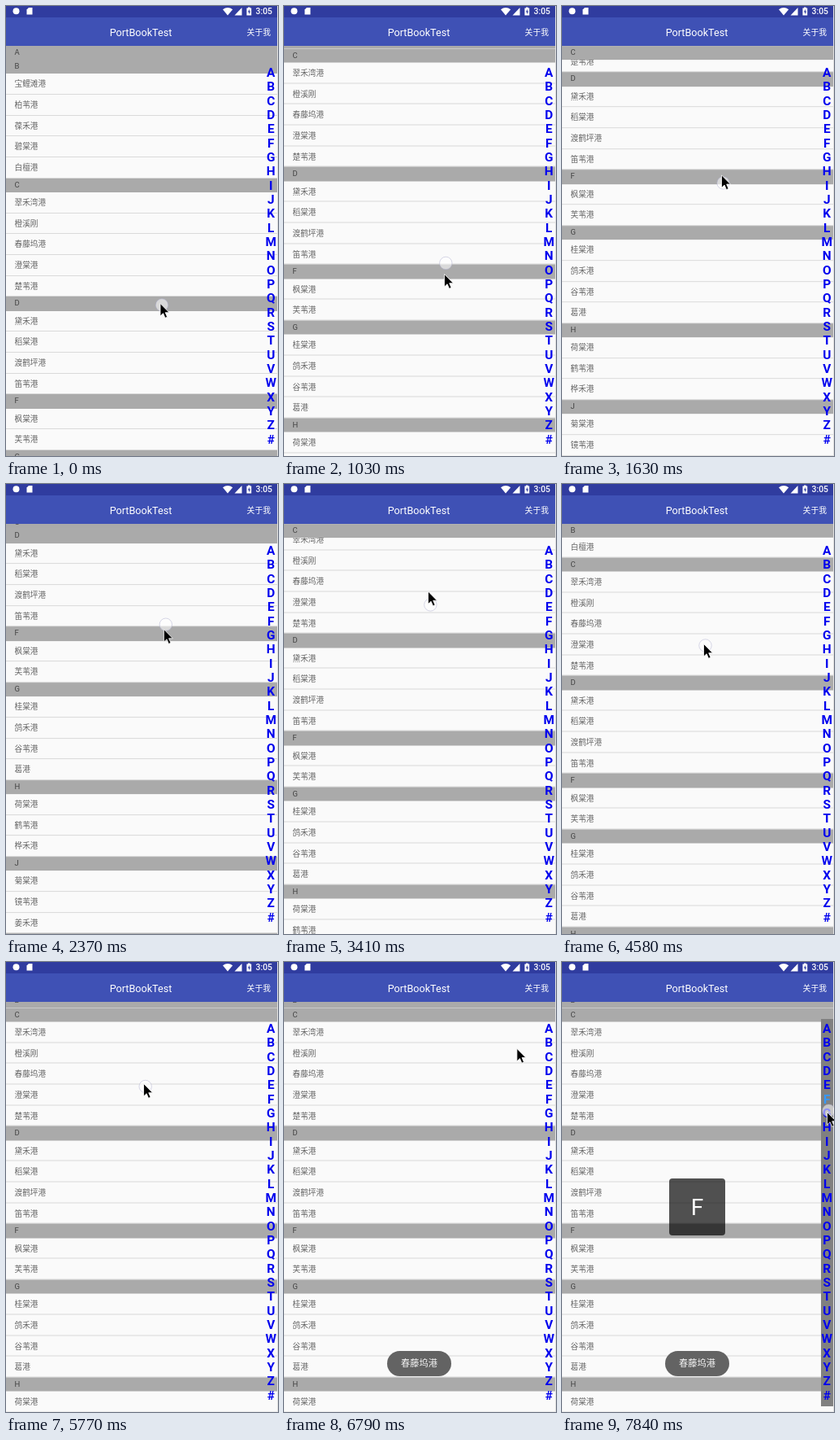
An HTML page for the animation above (7990 ms loop, 335 by 553 pixels).

```html
<!DOCTYPE html>
<html lang="zh-CN">
<head>
<meta charset="utf-8">
<title>Contact list</title>
<style>
html, body { margin: 0; width: 100%; height: 100%; overflow: hidden; }
body { position: relative; background: #fafafa; font-family: Roboto, "Noto Sans CJK SC", "Noto Sans CJK", sans-serif; }
body > * { position: absolute; }
#status { left: 0; top: 0; width: 333.5px; height: 14px; background: #303c9f; }
#bar { left: 0; top: 14px; width: 333.5px; height: 35px; background: #3f51b5; color: #fff; line-height: 37px; }
#bar b { position: absolute; width: 332px; text-align: center; font-weight: 400; font-size: 12.6px; }
#bar i { position: absolute; right: 7.5px; font-style: normal; font-size: 9.8px; }
#view { left: 0; top: 49px; width: 333.5px; height: 504px; overflow: hidden; }
#list { position: absolute; width: 100%; }
.head { position: relative; z-index: 1; height: 17.2px; line-height: 15px; padding-left: 10.5px; background: #aaa; color: #444; font-size: 9.5px; }
.item { box-sizing: border-box; height: 25.7px; line-height: 25px; padding-left: 10.5px; border-bottom: 1px solid #dadada; color: #666; font-size: 9.7px; }
#index { left: 319px; top: 70px; width: 14.5px; height: 476px; padding-top: 4px; box-sizing: border-box; color: #0000ee; font-weight: 700; font-size: 15.4px; }
#index div { height: 17.33px; line-height: 17.33px; display: flex; justify-content: center; }
#popup { left: 132px; top: 266px; width: 69px; height: 70px; border-radius: 4px; background: rgba(0,0,0,.68); color: #fff; font-size: 28px; line-height: 72px; text-align: center; }
#toast { left: 127px; top: 478px; width: 79px; height: 31px; border-radius: 16px; background: #636363; color: #f4f4f4; font-size: 11.2px; line-height: 31px; text-align: center; }
#edge { left: 333.5px; top: 0; width: 1.5px; height: 553px; background: #e2e2e2; }
#over { left: 0; top: 0; }
</style>
</head>
<body>
<div id="view"><div id="list"></div></div>
<div id="status"></div>
<div id="bar"><b>PortBookTest</b><i>关于我</i></div>
<div id="index"></div>
<div id="popup"></div>
<div id="toast">春藤坞港</div>
<div id="edge"></div>
<svg id="over" width="335" height="553">
  <g fill="#fff">
    <circle cx="12.5" cy="6.3" r="4"/>
    <path d="M28 2h4.5v8.6h-7V4.6z"/>
    <path d="M267 4.2Q273 -.2 279.2 4.2L273 11.4z"/>
    <path d="M290.5 2v9.4H281.5z"/>
    <path d="M298 1.4h2.6v1.2h1.6v8.8h-5.8V2.6H298z"/>
    <text x="307.5" y="10.3" font-size="10.4" font-weight="500">3:05</text>
  </g>
  <path d="M299.8 3.8l-2 3.6h1.4v2.8l2-3.7h-1.4z" fill="#303c9f"/>
  <circle id="dot" r="7.7" fill="#fff" fill-opacity=".55" stroke="#aaaacc" stroke-opacity=".6" stroke-width=".8"/>
  <path id="arrow" d="M0 0V15.5L3.6 12.2 6 17.8 8.6 16.7 6.2 11.2H11Z" stroke="#fff" stroke-width=".8"/>
</svg>
<script>
const LOOP = 7990, STEP = 148, HEAD = 17.2, ITEM = 25.7, LETTER = 17.33;
const $ = id => document.getElementById(id);

const ports = {
  A: '',
  B: '宝鲤滩港 柏苇港 葆禾港 碧棠港 白檀港',
  C: '翠禾湾港 橙溪刚 春藤坞港 澄棠港 楚苇港',
  D: '黛禾港 稻棠港 渡鹤坪港 笛苇港',
  F: '枫棠港 芙苇港',
  G: '桂棠港 鸽禾港 谷苇港 葛港',
  H: '荷棠港 鹤苇港 桦禾港',
  J: '菊棠港 镜苇港 姜禾港',
  L: '莲棠港 麓苇港 璃禾港'
};

function add(parent, text, className = '') {
  const el = document.createElement('div');
  el.className = className;
  el.textContent = text;
  return parent.appendChild(el);
}

let listHeight = 0;
const sections = Object.entries(ports).map(([letter, names]) => {
  const items = names.split(' ').filter(Boolean);
  const section = { head: add($('list'), letter, 'head'), y: listHeight, slack: items.length * ITEM };
  items.forEach(name => add($('list'), name, 'item'));
  listHeight += HEAD + section.slack;
  return section;
});

const letters = [...'ABCDEFGHIJKLMNOPQRSTUVWXYZ#'].map(c => add($('index'), c));

// Pointer gestures: end step, pointer position, list scroll, finger down on the way.
const gestures = [
  { end: 0, x: 190, y: 365.5, scroll: 0, down: true },
  { end: 5, x: 196, y: 205, scroll: 159.5, down: true },
  { end: 7, x: 197.5, y: 329.5, scroll: 159.5 },
  { end: 13, x: 196, y: 147, scroll: 334, down: true },
  { end: 15, x: 196, y: 147, scroll: 334 },
  { end: 20, x: 188, y: 305, scroll: 173.5, down: true },
  { end: 23, x: 177.5, y: 132, scroll: 173.5 },
  { end: 27, x: 174.5, y: 196.5, scroll: 121.5, down: true },
  { end: 31, x: 174.5, y: 196.5, scroll: 121.5, down: true },
  { end: 39, x: 169.5, y: 149.5, scroll: 155.5, down: true },
  { end: 47, x: 326, y: 92, scroll: 155.5 },
  { end: 53, x: 326.5, y: 184.5, scroll: 155.5, down: true }
];
const TOAST_STEP = 40, SLIDE_STEP = 47;

function pointerAt(k) {
  const i = Math.max(1, gestures.findIndex(g => g.end >= k));
  const a = gestures[i - 1], b = gestures[i];
  const p = Math.max(0, (k - a.end) / (b.end - a.end));
  const mix = key => a[key] + (b[key] - a[key]) * p;
  return { x: mix('x'), y: mix('y'), scroll: mix('scroll'), down: b.down || (p === 1 && gestures[i + 1]?.down) };
}

const place = (el, x, y) => el.setAttribute('transform', `translate(${x} ${y})`);
const show = (el, on) => { el.style.visibility = on ? 'visible' : 'hidden'; };

function draw(k) {
  const { x, y, scroll, down } = pointerAt(k);
  $('list').style.transform = `translateY(${-scroll}px)`;
  for (const s of sections) {
    const shift = Math.max(0, Math.min(scroll - s.y, s.slack));
    s.head.style.transform = `translateY(${shift}px)`;
  }

  // The touch dot trails slightly behind the arrow.
  const trail = pointerAt(k - .25);
  place($('arrow'), x, y);
  place($('dot'), trail.x + 2, trail.y + 2);
  show($('dot'), down);

  const sliding = k >= SLIDE_STEP;
  const active = sliding ? Math.max(0, Math.floor((y - 88) / LETTER)) : -1;
  letters.forEach((el, i) => { el.style.color = i === active ? '#3399ff' : ''; });
  $('index').style.background = sliding ? '#808080' : '';
  $('popup').textContent = sliding ? letters[active].textContent : '';
  show($('popup'), sliding);
  show($('toast'), k >= TOAST_STEP);
}

const start = performance.now();
function tick() {
  const t = (performance.now() - start) % LOOP;
  draw(Math.min(53, Math.floor((t + 10) / STEP)));
  requestAnimationFrame(tick);
}
tick();
</script>
</body>
</html>
```
